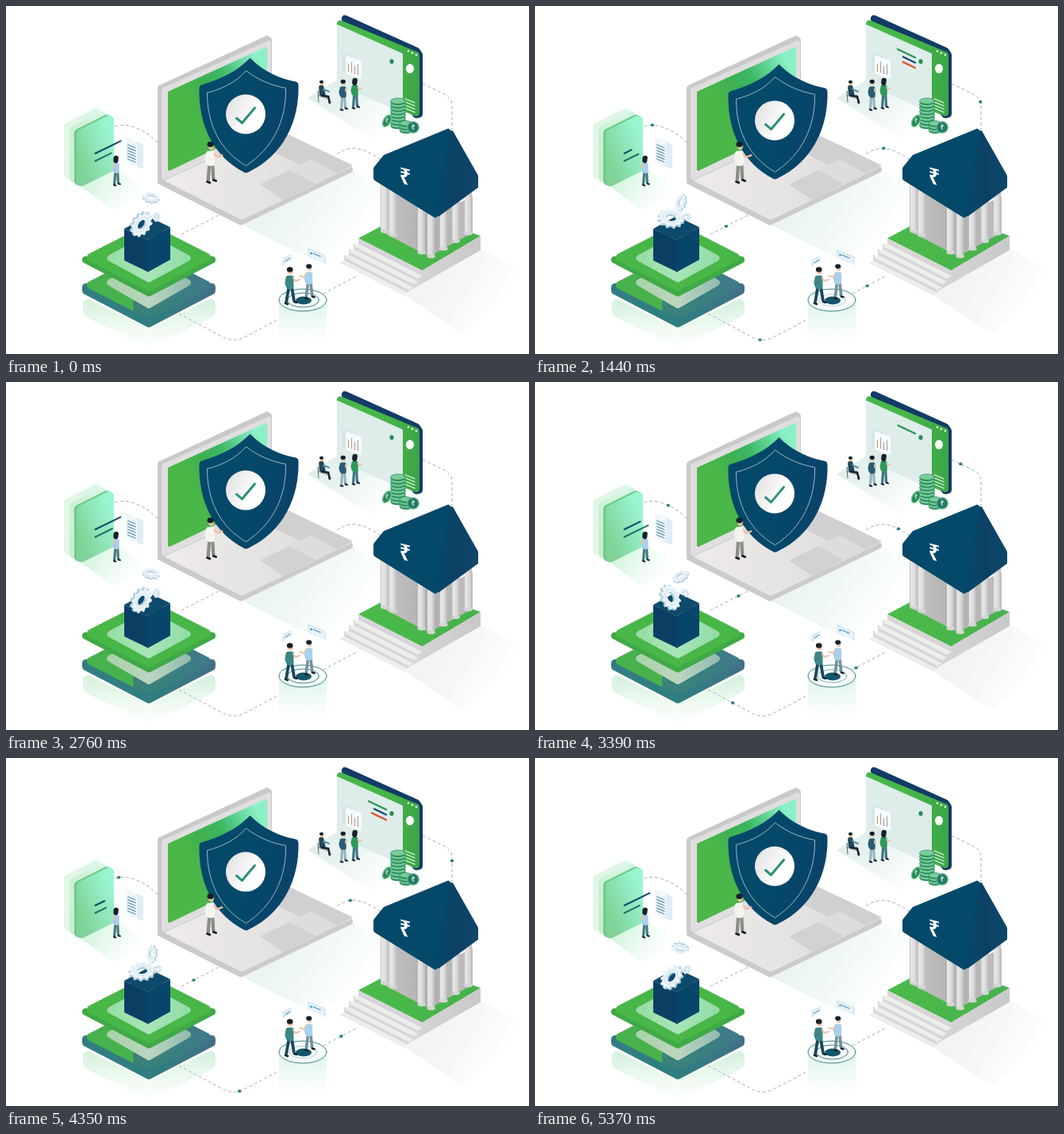
These frames come from a looping animation (659x439 px, 5400 ms). An HTML page with a canvas:

```html
<!DOCTYPE html>
<html lang="en">
<head>
<meta charset="utf-8">
<title>Secure banking</title>
<style>
html, body { margin: 0; width: 100%; height: 100%; overflow: hidden; background: #fff; }
canvas { display: block; width: 659px; height: 439px; }
</style>
</head>
<body>
<canvas id="stage" width="659" height="439"></canvas>
<script>
const ctx = document.getElementById('stage').getContext('2d');
const CYCLE = 2700, TAU = Math.PI * 2;
const NAVY = '#04486a', DEEP = '#0a3f63', INK = '#16202a', SKIN = '#f0bfa4';
const clamp = v => Math.max(0, Math.min(1, v));
const ramp = (t, a, b) => clamp((t - a) / (b - a));
const swing = p => Math.cos(p * TAU);

// Linear gradient; colours are evenly spread
function grad(x0, y0, x1, y1, ...colors) {
  const g = ctx.createLinearGradient(x0, y0, x1, y1);
  colors.forEach((c, i) => g.addColorStop(i / (colors.length - 1), c));
  return g;
}

function fill(color) {
  ctx.fillStyle = color;
  ctx.fill();
}

function poly(p, color, r = 0) {
  const n = p.length / 2, at = i => [p[(i % n) * 2], p[(i % n) * 2 + 1]];
  ctx.beginPath();
  if (r) {
    const [ax, ay] = at(n - 1), [bx, by] = at(0);
    ctx.moveTo((ax + bx) / 2, (ay + by) / 2);
    for (let i = 0; i < n; i++) ctx.arcTo(...at(i), ...at(i + 1), r);
  } else {
    for (let i = 0; i < n; i++) ctx.lineTo(...at(i));
  }
  ctx.closePath();
  fill(color);
}

// Upright panel: left edge x, y, width w, height h, slope k
const slab = (x, y, w, h, k, color, r = 0) =>
  poly([x, y, x + w, y + w * k, x + w, y + w * k + h, x, y + h], color, r);

// Flat isometric tile around cx, cy
const tile = (cx, cy, rx, ry, color, r = 0) =>
  poly([cx - rx, cy, cx, cy - ry, cx + rx, cy, cx, cy + ry], color, r);

function line(p, color, w = 1, cap = 'round') {
  ctx.beginPath();
  for (let i = 0; i < p.length; i += 2) ctx.lineTo(p[i], p[i + 1]);
  ctx.strokeStyle = color;
  ctx.lineWidth = w;
  ctx.lineCap = cap;
  ctx.lineJoin = 'round';
  ctx.stroke();
}

function oval(x, y, rx, ry, color, stroke, w = 1, rot = 0) {
  ctx.beginPath();
  ctx.ellipse(x, y, rx, ry, rot, 0, TAU);
  if (color) fill(color);
  if (stroke) { ctx.strokeStyle = stroke; ctx.lineWidth = w; ctx.stroke(); }
}

function rupee(x, y, size, color, skew = 0) {
  ctx.save();
  ctx.transform(.9, skew, 0, 1, x, y);
  ctx.font = `bold ${size}px "Noto Sans", "DejaVu Sans", sans-serif`;
  ctx.textAlign = 'center';
  ctx.textBaseline = 'middle';
  ctx.fillStyle = color;
  ctx.fillText('₹', 0, 0);
  ctx.restore();
}

// Standing figure, h from head to shoes
function figure(x, y, h, top, legs, { reach = 0, long = false, stride = 3 } = {}) {
  ctx.save();
  ctx.translate(x, y);
  ctx.scale(h / 46, h / 46);
  line([-1.5, 22, -stride, 42], legs, 3.8, 'butt');
  line([2, 22, stride, 40], legs, 3.8, 'butt');
  line([-stride - 1, 43, 2 - stride, 44], INK, 2.6);
  line([stride, 41, stride + 3, 42], INK, 2.6);
  poly([-5, 8, 4.5, 8, 4.5, 25, -4.5, 25], top, 3);
  line([-4, 10, -5.5, 17, -4, 22], top, 2.4);
  if (reach) line([4 * Math.sign(reach), 11, reach * .55, 15, reach, 13], SKIN, 2);
  oval(.5, 2.5, 3.2, 4, SKIN);
  oval(-.3, .4, 3.8, 3.2, INK);
  if (long) oval(-.8, 4, 3.8, 5, INK);
  ctx.restore();
}

function floors() {
  poly([298, 276, 437, 208, 510, 250, 388, 322],
    grad(350, 235, 440, 300, '#eaf5f3', '#f3faf8', '#ffffff'));
  poly([500, 363, 598, 306, 659, 338, 575, 414],
    grad(535, 335, 625, 385, '#f3f3f3', '#f8f8f8', '#ffffff'));
  poly([92, 226, 136, 203, 181, 231, 134, 257],
    grad(110, 215, 165, 248, '#d8f5e2', '#f0fbf4', '#ffffff'));
  poly([380, 116, 418, 93, 500, 132, 462, 168],
    grad(405, 98, 475, 162, '#e0efec', '#eff7f4', '#ffffff'));
  poly([97, 366, 180, 408, 264, 366, 264, 390, 180, 432, 97, 390],
    grad(0, 375, 0, 432, '#d8f2e0', '#eefaf1', '#ffffff'), 6);
  slab(344, 371, 60, 54, 0, grad(0, 371, 0, 425, '#ddf3ee', '#f0faf6', '#ffffff'));
}

// Dashed routes, each with the span of time a dot needs to run along it
const ROUTES = [
  ['M191,172 C178,158 150,143 133,154', -330, 2000],
  ['M472,194 C447,176 432,176 417,187', 60, 2360],
  ['M525,98 L552,111 Q562,116 562,126 L562,156', 390, 2280],
  ['M268,264 L219,289', 130, 2500],
  ['M218,388 L270,416 Q286,426 302,417 L342,396', 0, 2700],
  ['M400,363 L443,340', 450, 2750]
].map(([d, from, to]) => {
  const track = document.createElementNS('http://www.w3.org/2000/svg', 'path');
  track.setAttribute('d', d);
  return { track, shape: new Path2D(d), from, to };
});

function routes(t) {
  ROUTES.forEach(({ track, shape, from, to }) => {
    ctx.setLineDash([4, 3]);
    ctx.strokeStyle = '#9ba5aa';
    ctx.lineWidth = .9;
    ctx.lineCap = 'butt';
    ctx.stroke(shape);
    ctx.setLineDash([]);
    const dot = track.getPointAtLength(track.getTotalLength() * ramp(t, from, to));
    ctx.globalAlpha = ramp(t, from, from + 150) * ramp(t, 250, 450) * (1 - ramp(t, Math.min(to, 2300) - 150, Math.min(to, 2300)));
    oval(dot.x, dot.y, 2.2, 1.9, '#2b8087');
    ctx.globalAlpha = 1;
  });
}

function laptop() {
  poly([191, 215, 191, 224, 296, 277, 437, 209, 437, 201, 297, 262], '#cbcbcb', 3);
  poly([193, 217, 333, 152, 438, 202, 297, 270], grad(200, 200, 430, 215, '#efebeb', '#e6e3e3', '#dadada'), 4);
  poly([300, 166, 333, 151, 437, 201, 404, 217], '#d0d0d0');
  poly([357, 207, 384, 193, 416, 211, 389, 224], '#dddddd');
  poly([320, 225, 357, 207, 389, 224, 350, 245], '#d2d2d2');
  poly([191, 101, 329, 37, 335, 41, 335, 157, 196, 222, 191, 219], '#c9c9c9', 4);
  poly([196, 104, 334, 42, 334, 156, 196, 221], '#e0dede', 3);
  poly([204, 108, 329, 51, 329, 149, 204, 209],
    grad(215, 150, 328, 88, '#4cb748', '#4ab748', '#3fb04f', '#3ab560', '#5dd394', '#8cf0c6'), 2);
}

function shield(p) {
  ctx.save();
  ctx.translate(-.5, 4.5 - 4 * swing(p));
  const face = new Path2D('M308,65 C324,82 348,92 366,95 Q369,96 369,100 C370,145 350,188 306,209 Q303,211 300,209 C264,190 243,153 244,103 Q244,100 247,99 C270,92 292,82 308,65Z');
  ctx.fillStyle = grad(247, 120, 367, 140, NAVY, NAVY, NAVY, '#07456a', '#0c4267');
  ctx.fill(face);
  ctx.strokeStyle = '#9db8c4';
  ctx.lineWidth = 1;
  ctx.stroke(new Path2D('M303,81 C318,93 336,100 353,103 C354,143 337,179 303,201 C270,182 254,149 254,109 C273,104 290,96 303,81Z'));
  oval(302.5, 136, 25, 25, grad(278, 125, 327, 148, '#e4e4e4', '#f0f0f0', '#ffffff', '#ffffff'));
  line([291, 141, 298, 147, 314, 128], '#2b8f78', 3);
  ctx.restore();
}

function cards(p) {
  const tints = [['#e4f7e4', '#def7e8'], ['#c8efd0', '#d3f7e2'], ['#72c888', '#72c888'], ['#80d297', '#9af6d2']];
  tints.forEach(([a, b], i) => {
    const x = [-14, -7, -1, 2][i], y = [-8, -4, 0, 1][i];
    slab(87 + x, 157 + y, 47, 73, -.5, grad(87 + x, 190, 134 + x, 170, a, b), 6);
  });
  [20.5 + 11.5 * swing(p), 20 + 10 * Math.sin(p * TAU)].forEach((w, i) => {
    const y = 186 + i * 9.5;
    line([112.5, y, 112.5 + w, y - w * .49], i ? '#1f7560' : '#12476a', 2);
  });
  for (let d = 8; d >= 0; d -= 4) slab(151 + d, 165 + d / 2, 14, 31, .43, d ? '#dfedf6' : '#eff7fb', 1);
  for (let y = 175; y < 193; y += 3.6) line([153.5, y, 163, y + 4], '#5a93b0', 1.2);
  figure(139, 191, 37, '#a9cfe9', '#40777d', { reach: -7, long: true });
}

function coin(x, y, rx, ry) {
  oval(x, y + 1.6, rx, ry, '#2a8f62');
  oval(x, y, rx, ry, '#7ccb98', '#2b9065', .8);
}

function panel(t) {
  poly([420, 14, 427, 11, 520, 53, 525, 60, 525, 140, 515, 142], '#123b66', 5);
  slab(417, 16, 104, 82, .413, grad(417, 0, 521, 0, '#46b64b', '#48b748', '#3ca648'), 4);
  slab(417, 23, 83, 75, .446, '#deecea', 1);
  for (let i = 0; i < 3; i++) oval(507 + i * 5, 57 + i * 2.3, 1.3, 1.3, '#fff');
  oval(509, 79, 5, 6, '#f4fbf6');
  for (let i = 0; i < 4; i++) line([503, 117 + i * 4, 515, 122 + i * 4], '#e8f8ec', 1.3);
  slab(424, 59, 19, 23, .37, '#d3e4ec', 1);
  slab(428, 62, 20, 23, .35, '#f7fbfc', 1);
  for (let i = 0; i < 4; i++) {
    const x = 431.5 + i * 4, y = 83 + i * 1.4;
    line([x, y, x, y - 10 - i % 2 * 4], i % 2 ? '#8fa9bb' : '#e28a70', 1.2, 'butt');
  }
  oval(486, 70, 2.6, 2.9, '#268c57');

  // Chat lines grow leftwards one after another
  ctx.globalAlpha = 1 - ramp(t, 2350, 2600);
  ['#28945a', '#174b72', '#e2502f'].forEach((color, i) => {
    const from = 300 + i * 400, w = [22, 15, 18][i] * ramp(t, from, from + 400);
    if (t > from) line([479, 65 + i * 6.5, 479 - w, 65 + i * 6.5 - w * .48], color, 2.3);
  });
  ctx.globalAlpha = 1;

  // Seated reader
  line([393, 107, 394, 121], '#53646d');
  line([394, 113, 407, 117, 407, 123], '#53646d');
  poly([394, 100, 400, 100, 403, 113, 395, 113], '#204a5c', 2);
  line([398, 113, 406, 114, 408, 122], INK, 2.6);
  line([400, 105, 407, 108], '#5a8f9a', 2);
  oval(398, 97.5, 2.2, 2.8, SKIN);
  oval(397.5, 95.8, 2.6, 2, INK);
  figure(425, 95, 38, '#285b74', '#93b2c0', { reach: 6 });
  figure(440, 93, 38, '#2c9a58', '#397580', { reach: 10, long: true });

  for (let y = 150; y > 119; y -= 4.3) coin(494, y, 9.5, 3.7);
  for (let y = 156; y > 146; y -= 4) coin(504, y, 8, 3.3);
  oval(480, 145, 4.6, 8, '#2b8b5c', '#74c794', 1.2, .5);
  oval(513, 153, 7.2, 7.2, '#237c68', '#69bb96', 1.2);
  rupee(480, 145, 8, '#c9f0d4', .2);
  rupee(513, 153.5, 9, '#d8f5e2', .1);
}

function bank() {
  poly([444, 293, 508, 259, 598, 290, 525, 334], grad(444, 0, 598, 0, '#4dba4a', '#45b24c'));
  poly([525, 333, 598, 290, 598, 308, 500, 364], grad(510, 0, 598, 0, '#d6d6d6', '#c9c9c9'));
  for (let i = 3; i >= 0; i--) {
    const x = 444 - i * 6, y = 293 + i * 7;
    slab(x, y, 81, 7, .506, '#d6d6d6');
    poly([x, y + 7, x + 81, y + 48, x + 75, y + 51, x - 6, y + 10], '#ededed');
  }
  poly([472, 222, 543, 262, 588, 240, 588, 286, 533, 316, 472, 284], grad(472, 0, 588, 0, '#c5c5c5', '#b0b0b0', '#bdbdbd'));
  const column = (x, bottom, w) => {
    slab(x, 220, w, bottom - 220, 0, grad(x, 0, x + w, 0, '#e6e6e6', '#e0e0e0', '#bebebe'));
    oval(x + w / 2, bottom, w / 2 + .7, 2.4, '#d5d5d5');
  };
  for (let i = 0; i < 2; i++) column(473 + i * 10, 284 + i * 5, 9);
  column(519, 311, 9);
  for (let i = 0; i < 4; i++) column(578 - i * 15.6, 287 + i * 9.6, 9);
  poly([463, 204, 476, 188, 561, 153, 543, 269, 463, 219], NAVY, 3);
  poly([560.5, 153, 595, 214, 595, 229, 542, 268], grad(545, 0, 595, 0, '#07466a', '#0b4165', '#10486c'), 2);
  rupee(503, 217, 28, '#fff', .24);
}

function platform() {
  const lower = ctx.createLinearGradient(96, 0, 264, 0);
  [[0, '#45b04e'], [.38, '#48b34c'], [.385, '#3a8278'], [.75, '#3a7f80'], [1, '#44788c']].forEach(s => lower.addColorStop(...s));
  poly([96, 350, 180, 344, 264, 350, 264, 362, 180, 406, 96, 362], grad(96, 0, 264, 0, '#357c84', '#2f7f80', '#426f89'), 5);
  tile(180, 352, 84, 43, lower, 5);
  tile(180, 349, 57, 33, grad(122, 0, 237, 0, '#a6d3a4', '#bcd5c0', '#8eb9ae'), 4);
  poly([96, 316, 180, 310, 264, 316, 264, 323, 180, 367, 96, 323], '#3fa946', 4);
  tile(180, 317, 84, 43, '#49b648', 5);
  tile(180, 318, 57, 31, grad(122, 0, 237, 0, '#93dca0', '#a8e5b8', '#8edaa6'), 4);
  poly([149, 281, 178, 265, 207, 279, 178, 295], '#0d4a6e');
  slab(149, 281, 29, 40, .48, DEEP);
  slab(178, 295, 29, 41, -.55, '#07466a');
}

function cog(x, y, rx, ry, tilt, spin, teeth) {
  ctx.save();
  ctx.translate(x, y);
  ctx.rotate(tilt * Math.PI / 180);
  ['#a8c7d8', '#bfd8e5', '#edf5fa'].forEach((color, layer) => {
    const dy = rx * .085 * (2 - layer);
    ctx.beginPath();
    for (let i = 0; i < teeth * 4; i++) {
      const a = (i - .5) / (teeth * 4) * TAU + spin, k = i % 4 < 2 ? 1 : .82;
      ctx.lineTo(Math.cos(a) * rx * k, Math.sin(a) * ry * k + dy);
    }
    ctx.closePath();
    ctx.ellipse(0, dy, rx * .4, ry * .4, 0, 0, TAU);
    ctx.fillStyle = color;
    ctx.fill('evenodd');
  });
  oval(0, 0, rx * .6, ry * .6, null, '#c4dae6', .7);
  ctx.restore();
}

// Each wheel bobs and tumbles half a turn per cycle
function cogs(p) {
  const half = 180 * p, lag = Math.sin(Math.PI * p) ** 2, spin = p * TAU, bob = swing(p);
  cog(171.5, 271.3 + 4.7 * bob, 17.3, 11.4, 125 - half - 22 * lag, spin, 12);
  cog(183, 244.5 - 3.5 * bob, 11.4, 6.5, 10 - half + 14 * lag, spin, 9);
  cog(190.5, 265.8 + .7 * bob, 6.2, 4.3, 110 - half - 22 * lag, spin, 8);
}

function meeting(p) {
  const wave = (1 - swing(p)) / 2, y = wave * 2;
  oval(374, 371, 30, 14, '#f7fcfb', '#3a8184', 1);
  ctx.globalAlpha = 1 - wave * .7;
  oval(374.5, 371, 20 - wave * 3, 9 - wave * 1.5, null, '#3a8184');
  ctx.globalAlpha = 1;
  oval(375, 371.5, 10, 5, '#14566b');
  figure(358, 332, 46, '#3d8587', '#17475a', { reach: 12, stride: 5 });
  figure(382, 328, 43, '#a8d0ec', '#6f8f99', { reach: -13, stride: 4 });
  slab(349, 319 + y, 11, 7, -.5, '#e6f3fa', 1);
  line([349.5, 327 + y, 349.5, 319 + y, 359, 314 + y], '#b4d7e8', .9);
  line([352, 322 + y, 358, 318 + y], '#5f9fb9', 1.2);
  slab(381, 306 + y, 21, 10, .4, '#e6f3fa', 1);
  line([381, 315 + y, 381, 306 + y, 402, 315 + y, 402, 325 + y], '#bcdceb', .9);
  oval(384.5, 312 + y, 1.2, 1.2, '#3c85a8');
  line([387, 312 + y, 396, 316 + y], '#4c92b2', 1.2);
}

function draw(t) {
  const p = t / CYCLE;
  ctx.clearRect(0, 0, 659, 439);
  ctx.fillStyle = '#fff';
  ctx.fillRect(0, 0, 659, 439);
  floors();
  routes(t);
  laptop();
  shield(p);
  figure(258, 174, 51, '#f5f3f0', '#8b8d87', { reach: 13 });
  cards(p);
  panel(t);
  bank();
  platform();
  cogs(p);
  meeting(p);
}

const start = performance.now();
function tick() {
  draw((performance.now() - start) % CYCLE);
  requestAnimationFrame(tick);
}
draw(0);
requestAnimationFrame(tick);
</script>
</body>
</html>
```
